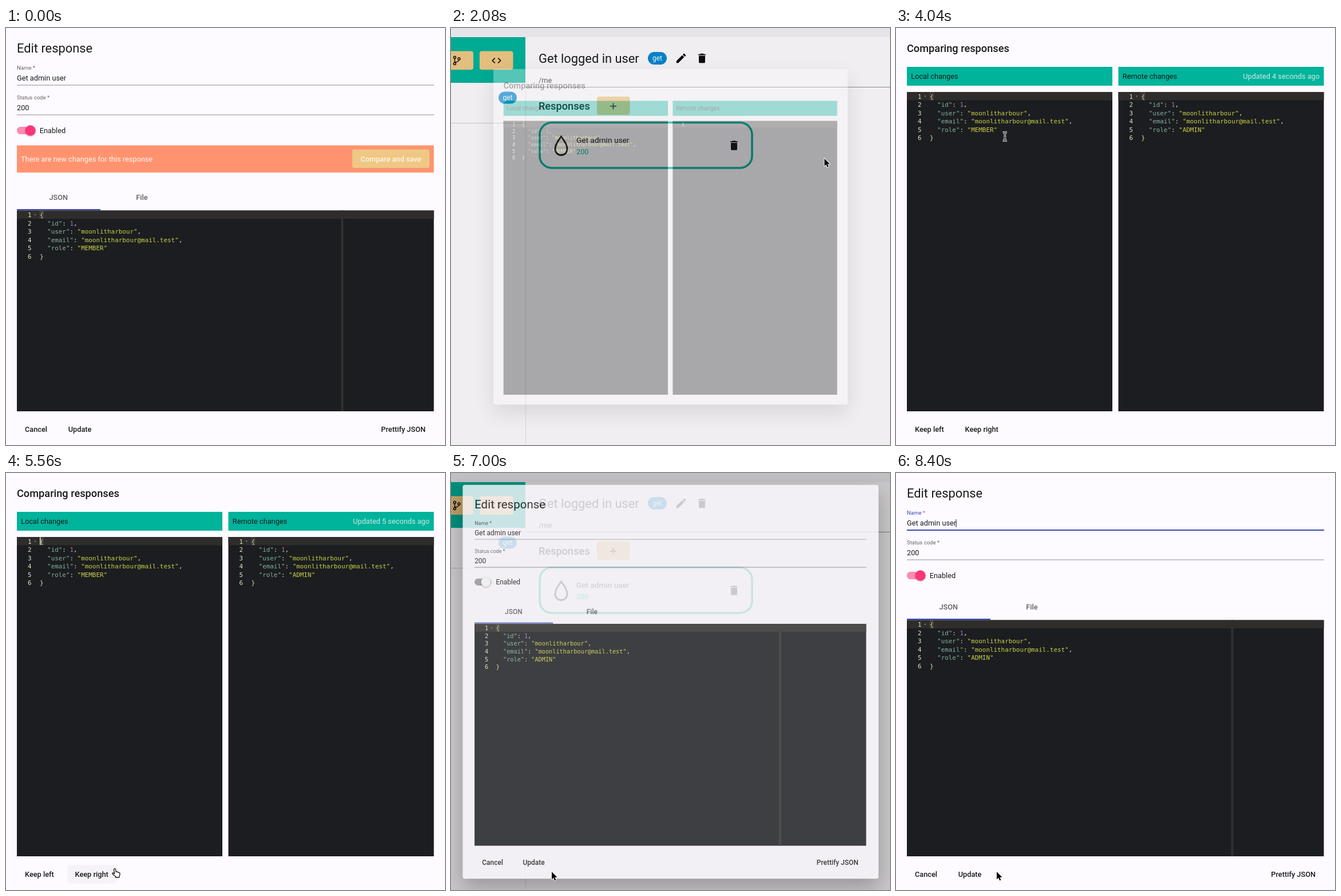
Animation, 767 px wide and 730 px high, one loop 8520 ms. Source, as an HTML page with a canvas:

```html
<!DOCTYPE html>
<html lang="en">
<head>
<meta charset="utf-8">
<title>Edit response</title>
<style>
html, body { margin: 0; width: 100%; height: 100%; overflow: hidden; background: #fdfbff; }
canvas { display: block; }
</style>
</head>
<body>
<canvas id="stage" width="767" height="730"></canvas>
<script>
const W = 767, H = 730, LOOP = 8520;
const view = document.getElementById('stage').getContext('2d');
const layer = document.createElement('canvas');
layer.width = W;
layer.height = H;
const layerCtx = layer.getContext('2d');
let g = view;

const PAPER = '#fdfbff', INK = '#1a1a1c', TEAL = '#00b39b', TAN = '#eec884';
const BLUE = '#3a47b5', PINK = '#fc3676', BODY = 12.75;
const USER = 'moonlitharbour', MAIL = 'moonlitharbour@mail.test';
const ICONS = {
  trash: new Path2D('M6 19c0 1.1.9 2 2 2h8c1.1 0 2-.9 2-2V7H6v12zM19 4h-3.5l-1-1h-5l-1 1H5v2h14V4z'),
  pencil: new Path2D('M3 17.25V21h3.75L17.8 9.94l-3.75-3.75zM20.7 7.04c.4-.4.4-1 0-1.4l-2.34-2.35c-.4-.4-1-.4-1.4 0l-1.84 1.84 3.75 3.75z'),
  code: new Path2D('M9.4 16.6L4.8 12l4.6-4.6L8 6l-6 6 6 6zM14.6 16.6l4.6-4.6-4.6-4.6L16 6l6 6-6 6z')
};
const ARROW = new Path2D('M0 0V13.4L3 10.6L5.1 15.4L7.4 14.4L5.4 9.8H9.5Z');
const BEAM = new Path2D('M-3.5 -7.5Q0 -7.5 0 -5Q0 -7.5 3.5 -7.5M0 -5V5M-3.5 7.5Q0 7.5 0 5Q0 7.5 3.5 7.5M-2 2H2');
const HAND = new Path2D(
  'M-1.6 1.2 Q-1.4 -0.4 0 -0.4 Q1.3 -0.4 1.5 1.2 L2.2 5.4 Q4.2 4.2 4.9 5.8 Q6.6 5 7 6.6 ' +
  'Q9 6.2 9 8.4 Q9 11 7.8 13 V15 H1.6 V13.6 L-4.2 8.8 Q-4.6 7 -2.6 7 L-0.4 8.6 Z');

const clamp = v => Math.max(0, Math.min(1, v));
const ramp = (t, from, to) => clamp((t - from) / (to - from));
const mix = (a, b, p) => a + (b - a) * p;

function bezier(x1, y1, x2, y2) {
  const at = (a, b, s) => 3 * (1 - s) * (1 - s) * s * a + 3 * (1 - s) * s * s * b + s * s * s;
  return x => {
    if (x <= 0 || x >= 1) return clamp(x);
    let lo = 0, hi = 1;
    for (let i = 0; i < 24; i++) {
      const s = (lo + hi) / 2;
      if (at(x1, x2, s) < x) lo = s; else hi = s;
    }
    return at(y1, y2, lo);
  };
}
const easeOpen = bezier(0, 0, 0.2, 1);
const easeShade = bezier(0.25, 0.8, 0.25, 1);

function rect(x, y, w, h, color, r = 0) {
  g.fillStyle = color;
  g.beginPath();
  g.roundRect(x, y, w, h, r);
  g.fill();
}

function circle(x, y, r, color) {
  g.fillStyle = color;
  g.beginPath();
  g.arc(x, y, r, 0, Math.PI * 2);
  g.fill();
}

// y is the middle of the capital letters
function text(str, x, y, { size = BODY, weight = 400, color = INK, align = 'left' } = {}) {
  g.font = `${weight} ${size}px Roboto, sans-serif`;
  g.textAlign = align;
  g.fillStyle = color;
  g.fillText(str, x, y + size * 0.36);
  return g.measureText(str).width;
}

function icon(name, x, y, color = '#0c0c0c', size = 21.9) {
  g.save();
  g.translate(x - size / 2, y - size / 2);
  g.scale(size / 24, size / 24);
  g.fillStyle = color;
  g.fill(ICONS[name]);
  g.restore();
}

function chip(x, y, w, h) {
  rect(x - w / 2, y - h / 2, w, h, '#0288d1', h / 2);
  text('get', x, y, { size: 12, color: '#fff', align: 'center' });
}

function branchIcon(x, y) {
  g.strokeStyle = '#0c0c0c';
  g.lineWidth = 1.5;
  g.beginPath();
  for (const [dx, dy] of [[-3.5, -5.5], [-3.5, 5.5], [4, -3]]) {
    g.moveTo(x + dx + 2, y + dy);
    g.arc(x + dx, y + dy, 2, 0, Math.PI * 2);
  }
  g.moveTo(x - 3.5, y - 3.5);
  g.lineTo(x - 3.5, y + 3.5);
  g.moveTo(x + 4, y - 1);
  g.quadraticCurveTo(x + 3.5, y + 2, x - 3, y + 3);
  g.stroke();
}

function drawPage() {
  rect(0, 0, W, H, '#fcfafd');
  rect(0, 0, W, 16, '#f1eff3');
  rect(130, 96, 1, H - 96, '#e3e1e5');
  rect(0, 166, 130, 1, '#cfcdd1');
  rect(0, 16, 130, 80, TEAL);
  rect(-20, 40.5, 59, 32.5, TAN, 4);
  rect(50, 40.5, 58.5, 32.5, TAN, 4);
  branchIcon(10, 57);
  icon('code', 79.5, 57, '#0c0c0c', 20);
  chip(99, 122, 32, 21);

  text('Get logged in user', 153, 53, { size: 21.85 });
  chip(360.5, 53, 33, 22);
  icon('pencil', 402, 53);
  icon('trash', 438.5, 53);
  text('/me', 153, 91);
  rect(131, 103, W - 131, 1, '#8e8d90');
  text('Responses', 153, 136, { size: 18.2, weight: 500 });
  rect(255, 120, 57.5, 32, TAN, 4);
  rect(278, 136, 11, 1.6, INK);
  rect(282.7, 131.3, 1.6, 11, INK);

  g.strokeStyle = TEAL;
  g.lineWidth = 3.6;
  g.beginPath();
  g.roundRect(155, 165.5, 371, 79.5, 21);
  g.stroke();
  g.strokeStyle = '#0c0c0c';
  g.lineWidth = 2.8;
  g.beginPath();
  g.moveTo(192.5, 190);
  g.bezierCurveTo(186, 199, 182, 205, 182, 211.5);
  g.bezierCurveTo(182, 218, 186.5, 222.5, 192.5, 222.5);
  g.bezierCurveTo(198.5, 222.5, 203, 218, 203, 211.5);
  g.bezierCurveTo(203, 205, 199, 199, 192.5, 190);
  g.closePath();
  g.stroke();
  text('Get admin user', 219, 196.5, { size: 13.7 });
  text('200', 219, 216, { color: TEAL });
  icon('trash', 494.5, 205.5);
}

const userJson = role =>
  ['{', '  "id": 1,', `  "user": "${USER}",`, `  "email": "${MAIL}",`, `  "role": "${role}"`, '}'];

function tokenColor(token) {
  if (/^".*":$/.test(token)) return '#86b39c';
  if (token[0] === '"') return '#cdd046';
  if (/\d/.test(token)) return '#a577a8';
  return '#e6e0b4';
}

function editor(x, y, w, h, lines, { margin = false, caret = false } = {}) {
  const step = 14.58, cell = 6.56, left = x + 40;
  rect(x, y, w, h, '#1b1d20');
  if (margin) rect(585.5, y, 4, h, '#33302f');
  rect(x, y, w, step, '#2f2d2c');
  g.font = '10.9px "DejaVu Sans Mono", monospace';
  lines.forEach((line, row) => {
    const base = y + 7.6 + step * row + 3.9;
    g.textAlign = 'right';
    g.fillStyle = '#e9e5c4';
    g.fillText(row + 1, x + 25.6, base);
    g.textAlign = 'left';
    for (const m of line.matchAll(/"[^"]*":?|\d+|[{},]/g)) {
      const key = m[0].endsWith(':');
      g.fillStyle = tokenColor(m[0]);
      g.fillText(key ? m[0].slice(0, -1) : m[0], left + m.index * cell, base);
      if (key) {
        g.fillStyle = '#e6e0b4';
        g.fillText(':', left + (m.index + m[0].length - 1) * cell, base);
      }
    }
  });
  if (lines.length > 1) {
    g.fillStyle = '#77756f';
    g.beginPath();
    g.moveTo(x + 30, y + 6.5);
    g.lineTo(x + 34, y + 6.5);
    g.lineTo(x + 32, y + 9);
    g.fill();
    g.strokeStyle = 'rgba(230,224,180,.2)';
    g.lineWidth = 1;
    g.strokeRect(left + 0.5, y + 1, cell - 1, step - 2);
  }
  if (caret) rect(left, y + 0.5, 1.6, step - 1, '#efe9c8');
}

function field(label, value, y, focused) {
  const size = 9.56;
  const w = text(label, 19, y - 30.5, { size, color: focused ? BLUE : '#626165' });
  text(' *', 19 + w, y - 30.5, { size, color: focused ? PINK : '#626165' });
  text(value, 19, y - 12.5);
  if (focused) rect(19, y - 1, 729, 2, BLUE);
  else rect(19, y - 0.5, 729, 1, '#8d8c90');
}

function toggle(pos, tint) {
  rect(19, 173, 31, 13, '#9c9b9e', 6.5);
  g.save();
  g.globalAlpha = tint;
  rect(19, 173, 31, 13, '#ff8bb0', 6.5);
  g.restore();
  const x = mix(28, 42.5, pos);
  g.save();
  g.shadowColor = 'rgba(0,0,0,.35)';
  g.shadowBlur = 3;
  g.shadowOffsetY = 1;
  circle(x, 179.5, 9, '#fafafa');
  g.restore();
  g.save();
  g.globalAlpha = tint;
  circle(x, 179.5, 9.2, PINK);
  g.restore();
}

function drawEdit(t, changed, role) {
  const shift = changed ? 62 : 0;
  const top = 257.5 + shift;
  text('Edit response', 19, 35, { size: 21.85 });
  field('Name', 'Get admin user', 100, !changed && t >= 7100);
  field('Status code', '200', 152, false);
  if (!changed && ((t >= 7420 && t < 7920) || t >= 8400)) rect(104.6, 81, 1, 14, INK);
  toggle(changed ? 1 : ramp(t, 6932, 7014), changed ? 1 : ramp(t, 7005, 7085));
  text('Enabled', 58.7, 179.3);

  if (changed) {
    rect(19, 205.5, 728.5, 47.5, '#ff9370');
    text('There are new changes for this response', 26, 229, { color: '#fff8f4' });
    rect(605, 212.5, 135, 32.5, TAN, 4);
    rect(605, 212.5, 135, 32.5, `rgba(0,0,0,${0.1 * ramp(t, 1660, 1780)})`, 4);
    text('Compare and save', 672.5, 229, { weight: 500, color: '#fff6e6', align: 'center' });
  }
  const tab = { weight: 500, color: '#626166', align: 'center' };
  text('JSON', 91.7, 234.3 + shift, tab);
  text('File', 237.5, 234.3 + shift, tab);
  rect(19, top - 2.5, 146, 2, BLUE);
  editor(19, top, 728.5, 671 - top, userJson(role), { margin: true });
  text('Cancel', 33, 702, { weight: 500 });
  text('Update', 108.7, 702, { weight: 500 });
  text('Prettify JSON', 733, 702, { weight: 500, align: 'right' });
}

function drawCompare(t) {
  text('Comparing responses', 19, 35, { size: 18.2, weight: 500 });
  for (const [x, label] of [[19, 'Local changes'], [388.5, 'Remote changes']]) {
    rect(x, 68, 359, 33, TEAL);
    text(label, x + 7.3, 84.3);
  }
  if (t >= 3000) {
    const age = Math.min(6, Math.floor(t / 1000));
    text(`Updated ${age} seconds ago`, 740, 84.3, { color: '#cdeae5', align: 'right' });
  }
  // the buttons take their row once the remote side has loaded
  const loaded = t >= 2190;
  const height = loaded ? 559 : 599;
  const caret = t >= 2240 && (t - 2240) % 1000 < 500;
  editor(19, 112, 359, height, userJson('MEMBER'), { caret });
  editor(388.5, 112, 359, height, loaded ? userJson('ADMIN') : ['']);
  if (!loaded) return;
  const tone = 0.03 * ramp(t, 5440, 5540) + 0.13 * ramp(t, 6700, 6820);
  rect(107.5, 686, 86, 32.5, `rgba(0,0,0,${tone})`, 4);
  text('Keep left', 33, 702, { weight: 500 });
  text('Keep right', 120.5, 702, { weight: 500 });
}

const dialogs = [
  { open: -1000, close: 1790, draw: t => drawEdit(t, true, 'MEMBER') },
  { open: 2064, close: 6850, draw: drawCompare },
  { open: 6934, close: 1e5, draw: t => drawEdit(t, false, 'ADMIN') }
];

function drawDialog({ open, close, draw }, t) {
  const shade = easeShade(ramp(t, open, open + 400)) * (1 - easeShade(ramp(t, close, close + 400)));
  rect(0, 0, W, H, `rgba(0,0,0,${0.32 * shade})`);
  const enter = easeOpen(ramp(t, open, open + 150));
  const alpha = enter * (1 - ramp(t, close, close + 75));
  if (alpha <= 0) return;

  const scale = mix(0.7, 1, enter);
  g = layerCtx;
  g.clearRect(0, 0, W, H);
  g.save();
  g.translate(383, 365.5);
  g.scale(scale, scale);
  g.translate(-383, -365.5);
  g.save();
  g.shadowColor = 'rgba(0,0,0,.32)';
  g.shadowBlur = 36;
  g.shadowOffsetY = 14;
  rect(-3, -1.5, 773.5, 734, PAPER, 4);
  g.restore();
  draw(t);
  g.restore();
  g = view;
  g.save();
  g.globalAlpha = alpha;
  g.drawImage(layer, 0, 0);
  g.restore();
}

// time, x, y of the pointer's hot spot
const path = [
  [480, 780, 310], [1080, 652, 228], [2400, 652.5, 228.5], [2660, 600, 206], [3050, 545, 188],
  [3500, 520, 200], [4050, 190, 190], [4440, 200, 222], [5240, 215, 600], [5520, 190, 693],
  [6100, 190, 693], [6500, 176, 698], [LOOP, 176, 698]
];

function pointerAt(t) {
  const i = path.findIndex(k => k[0] > t);
  if (i < 1) return null;
  const [t0, x0, y0] = path[i - 1], [t1, x1, y1] = path[i];
  const u = ramp(t, t0, t1), p = u * u * (3 - 2 * u);
  return [mix(x0, x1, p), mix(y0, y1, p)];
}

function pointerKind(t, x, y) {
  const inside = (l, top, r, b) => x >= l && x <= r && y >= top && y <= b;
  if (t < 1800) {
    if (inside(605, 212, 740, 245)) return 'hand';
    return inside(19, 320, 747, 671) ? 'beam' : 'arrow';
  }
  if (t < 2130 || t >= 6860) return 'arrow';
  if (inside(107, 686, 194, 718)) return 'hand';
  return inside(19, 112, 378, 671) || inside(388, 112, 747, 671) ? 'beam' : 'arrow';
}

function outline(shape, color, width) {
  g.strokeStyle = color;
  g.lineWidth = width;
  g.stroke(shape);
}

function drawPointer(t) {
  const pos = pointerAt(t);
  if (!pos) return;
  const kind = pointerKind(t, ...pos);
  g.save();
  g.translate(...pos);
  g.lineJoin = 'round';
  if (kind === 'beam') {
    outline(BEAM, '#e8e8e8', 3.4);
    outline(BEAM, '#111', 1.2);
  } else if (kind === 'hand') {
    g.fillStyle = '#fff';
    g.fill(HAND);
    outline(HAND, '#111', 1.3);
  } else {
    outline(ARROW, '#fff', 2);
    g.fillStyle = '#0a0a0a';
    g.fill(ARROW);
  }
  g.restore();
}

const start = performance.now();
function frame() {
  const t = (performance.now() - start) % LOOP;
  drawPage();
  for (const d of dialogs) drawDialog(d, t);
  drawPointer(t);
  requestAnimationFrame(frame);
}
frame();
</script>
</body>
</html>
```
